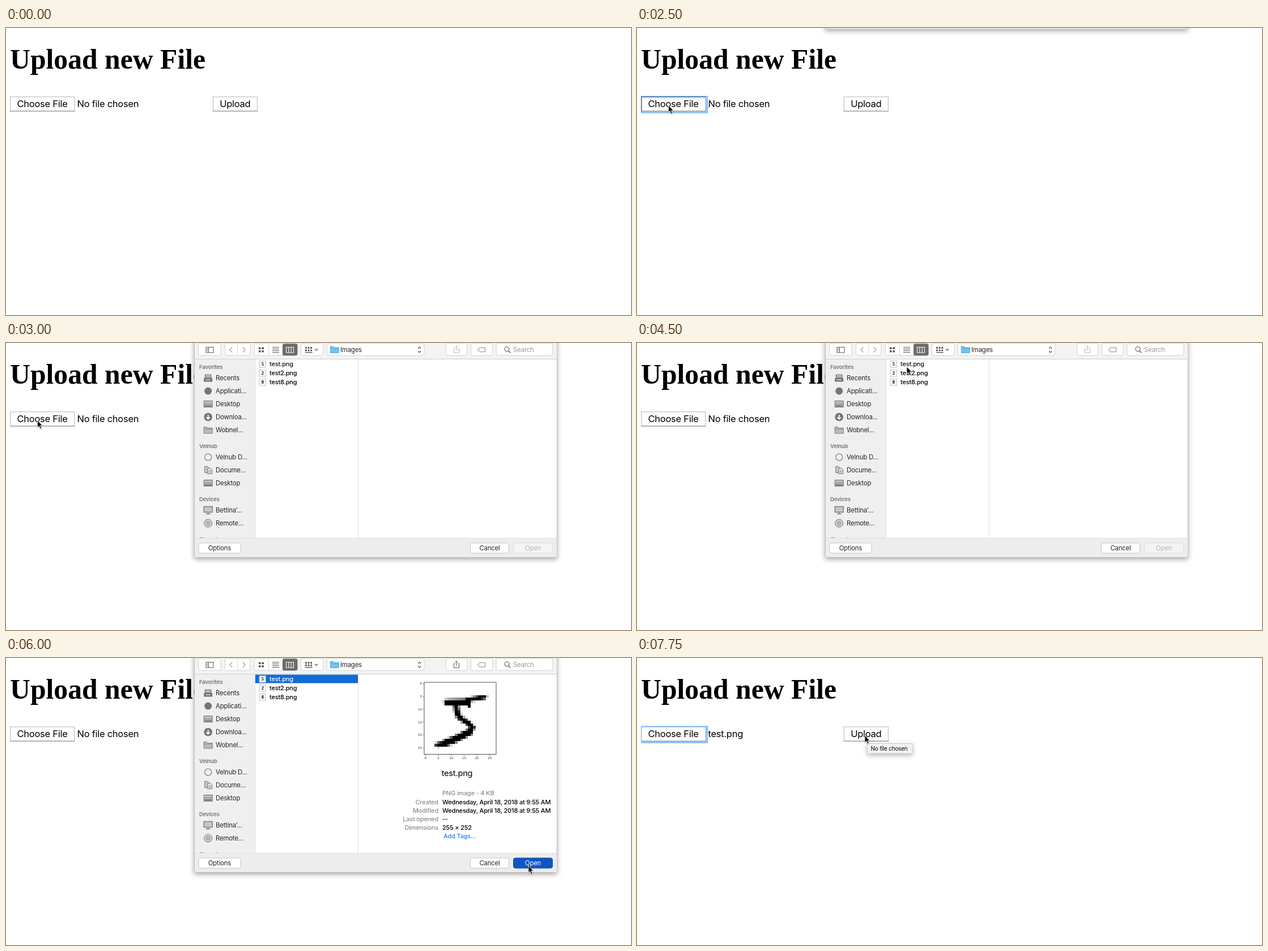
An HTML page that plays this animation: 1103 px wide and 508 px high, repeating every 8 s.

```html
<!DOCTYPE html>
<html lang="en">
<head>
<meta charset="utf-8">
<title>Upload new File</title>
<style>
  html, body { margin: 0; width: 100%; height: 100%; overflow: hidden; background: #fff; }
  svg { display: block; width: 1103px; height: 508px; }
  text { font-family: Inter, Roboto, sans-serif; letter-spacing: -.017em; white-space: pre; }
  .title { font: bold 49.7px "Liberation Serif", "Times New Roman", serif; letter-spacing: 0; }
  .form { font-size: 16.55px; }
  .ui { font-size: 11.4px; fill: #262626; }
  .head { font-size: 9.6px; font-weight: 600; fill: #747474; }
  .small { font-size: 11px; font-weight: 500; }
  .dim { fill: #8c8c8c; }
  .tick { font: 5.6px "DejaVu Sans", sans-serif; letter-spacing: 0; fill: #333; }
  .mid { text-anchor: middle; }
  .end { text-anchor: end; }
  .sheet { filter: drop-shadow(0 3px 5px rgba(0, 0, 0, .36)); }
  .tip { filter: drop-shadow(0 3px 4px rgba(0, 0, 0, .28)); }
  #cursor { filter: drop-shadow(0 1px 1px rgba(0, 0, 0, .3)); }
</style>
</head>
<body>
<svg id="stage" viewBox="0 0 1103 508" xmlns="http://www.w3.org/2000/svg"></svg>
<script>
const rect = (x, y, w, h, fill, more = '') =>
  `<rect x="${x}" y="${y}" width="${w}" height="${h}" fill="${fill}" ${more}/>`;
const text = (x, y, cls, str, more = '') =>
  `<text x="${x}" y="${y}" class="${cls}" ${more}>${str}</text>`;
const line = (d, color = '#666', w = 1, more = '') =>
  `<path d="${d}" fill="none" stroke="${color}" stroke-width="${w}" ${more}/>`;
const circle = (x, y, r, fill, more = '') =>
  `<circle cx="${x}" cy="${y}" r="${r}" fill="${fill}" ${more}/>`;
const group = (id, body) => `<g id="${id}">${body}</g>`;
const range = n => [...Array(n).keys()];

// Web page
const formButton = (x, w, label) =>
  rect(x, 121, w, 27, '#fff') +
  line(`M${x + .8} 148V121.8H${x + w - .8}V148`, '#cdcdcd', 1.6) +
  line(`M${x} 147.2H${x + w}`, '#aaa', 1.7) +
  text(x + 12.5, 140.2, 'form', label);

const page =
  text(7, 72.4, 'title', 'Upload new File') +
  formButton(7, 114.5, 'Choose File') +
  formButton(364.7, 79.6, 'Upload') +
  group('ring',
    line('M7.5 120V151', '#9fbfe8', 1.4) +
    rect(7, 120, 118, 2.6, '#92c3f7') +
    rect(7, 148, 118, 3, '#92c3f7') +
    rect(121.2, 120, 4.2, 31, '#92c3f7')) +
  group('press', line('M8 148V121.8H121.5', '#5b80b8', 1.7)) +
  group('none', text(125.5, 140.2, 'form', 'No file chosen')) +
  group('chosen', text(125.5, 140.2, 'form', 'test.png'));

// Dialog toolbar
const box = (x, w, fill = '#fff', edge = '#d2d2d2') =>
  rect(x + .5, .5, w - 1, 21.5, fill, `rx="3.5" stroke="${edge}"`);
const chevron = (x, dir) => line(`M${x - 2.3 * dir} 7.5L${x + 2.3 * dir} 12L${x - 2.3 * dir} 16.5`, '#a2a2a2', 1.2);
const dots = (x, y, cols, rows, gap, size) => range(cols * rows)
  .map(i => rect(x + i % cols * gap, y + (i / cols | 0) * gap, size, size, '#555', 'rx=".5"')).join('');
const folder = (x, y, fill, edge) =>
  `<path d="M${x} ${y + 1}h5l1.5 2h8.5v9.5h-15z" fill="${fill}" stroke="${edge}" stroke-width=".9"/>` +
  line(`M${x} ${y + 4.8}h15`, edge, .7);
const shareIcon = color =>
  line('M792.5 9.8H790.5V17.3H799.5V9.8H797.5M795 14V5.5M792.6 7.6L795 5.2L797.4 7.6', color, 1);

const toolbar =
  rect(333, 0, 639, 28, '#f3f3f3') +
  box(339, 40.5) +
  rect(353, 7.5, 13, 9.5, 'none', 'stroke="#555"') +
  line('M357.5 7.5v9.5M354.5 10h2M354.5 12h2M354.5 14h2', '#555', .9) +
  box(386, 45.5) + line('M408.5 1V22', '#dadada') + chevron(397, -1) + chevron(420, 1) +
  box(438, 76) + line('M463.5 1V22', '#dadada') +
  dots(446, 7.5, 2, 2, 5.4, 3.6) +
  line('M470 7.5h12M470 10.5h12M470 13.5h12M470 16.5h12', '#555') +
  rect(488, 1.2, 26.5, 21, '#6c6c6c', 'rx="3"') +
  rect(494.5, 7.5, 13, 9.5, 'none', 'stroke="#fff"') + line('M498.8 7.5v9.5M503.2 7.5v9.5', '#fff') +
  box(520, 40.5) +
  dots(528, 7, 3, 2, 4.6, 2.9) + rect(528, 16, 12.5, 1.4, '#555') +
  line('M545 10.5L547.6 13.2L550.2 10.5', '#555', 1.2) +
  box(566, 172.5) + folder(572.3, 5, '#70c3ee', '#4fa9d9') +
  text(590, 16, 'ui', 'Images') +
  line('M727.2 9.8L729.7 7.2L732.2 9.8M727.2 14.2L729.7 16.8L732.2 14.2', '#444', 1.2) +
  box(776, 38) + group('shareOff', shareIcon('#b4b4b4')) + group('shareOn', shareIcon('#555')) +
  box(820, 39) + line('M832 12L835.2 8.3H845.5V15.7H835.2Z', '#888') + circle(835.7, 12, .8, '#888') +
  box(864.5, 101) + circle(884, 10.8, 4, 'none', 'stroke="#555" stroke-width="1.1"') +
  line('M887 14L890.5 17.5', '#555', 1.3) +
  text(895, 16, 'ui', 'Search', 'style="fill:#9c9c9c"') +
  line('M333 28.5H972', '#cfcfcf');

// Sidebar icons, drawn around 0,0
const G = '#747474';
const icons = {
  recents: rect(-6, -6.5, 12, 8, '#8a8a8a', 'rx="1"') + line('M-4 -4.3H4M-4 -2H4', '#eee') +
    rect(-7.5, 0, 15, 6.5, G, 'rx="1"') + line('M-4 3H4', '#e8e8e8', 1.4),
  disc: circle(0, 0, 6.5, G),
  desk: rect(-7.5, -5.5, 15, 11, '#aaa', `stroke="${G}"`) + line('M-7 -3.5H7', '#ddd') +
    line('M-5.5 3.4H5.5', '#555', 1.6, 'stroke-dasharray="2 1"'),
  down: circle(0, 0, 7.3, G) + line('M0 -4V3M-3.2 .4L0 3.7L3.2 .4', '#fff', 1.8),
  folder: folder(-7.5, -6.5, '#bababa', G),
  ring: circle(0, 0, 6, 'none', `stroke="${G}" stroke-width="1.1"`),
  docs: `<path d="M-6 -6.5h5l2 2v9h-7z" fill="#c8c8c8" stroke="${G}"/>` +
    `<path d="M-1 -3.5h5l3 3v7h-8z" fill="#ddd" stroke="${G}"/>` + line('M1 1.5H5M1 3.8H5', G, .8),
  screen: rect(-7.5, -6.5, 15, 10, '#c6c6c6', `stroke="${G}" stroke-width="1.3"`) + line('M0 4V6M-4 6.5H4', G, 1.3),
  cd: circle(0, 0, 7, '#d2d2d2', `stroke="${G}"`) + circle(0, 0, 3.6, 'none', 'stroke="#999"') +
    circle(0, 0, 1.7, '#f4f4f4', `stroke="${G}"`)
};
const places = [
  [42, 'Favorites'], [62, 'Recents', 'recents'], [85, 'Applicati...', 'disc'],
  [108, 'Desktop', 'desk'], [131, 'Downloa...', 'down'], [154, 'Wobnel...', 'folder'],
  [182, 'Velnub'], [202, 'Velnub D...', 'ring'], [225, 'Docume...', 'docs'], [248, 'Desktop', 'desk'],
  [276, 'Devices'], [296, 'Bettina’...', 'screen'], [319, 'Remote...', 'cd'], [347, 'Shared']
];
const sidebar =
  rect(333, 29, 106, 316.5, '#efefef') + line('M439.5 29V345.5', '#dcdcdc') +
  `<g clip-path="url(#side)">` + places.map(([y, label, icon]) => icon
    ? `<g transform="translate(356.7 ${y})">${icons[icon]}</g>` + text(370, y + 4, 'ui', label)
    : text(341, y + 3.5, 'head', label)).join('') + '</g>';

// File column
const files = ['test.png', 'test2.png', 'test8.png'].map((name, i) => {
  const y = 37 + 16 * i;
  return rect(447, y - 5.5, 11.5, 11.5, '#fafafa', 'stroke="#b5b5b5" stroke-width=".8"') +
    text(452.8, y + 3.2, 'mid', '528'[i], 'style="font:bold 8.5px Liberation Serif,serif"') +
    text(465, y + 4, `small file${i}`, name);
}).join('');

// Handwritten digit: strokes of [half width, x, y, x, y, ...] sampled on a 28 x 28 grid
const strokes = [
  [1.1, 8.4, 7.4, 16.2, 7.2], [.7, 16, 6.4, 19, 5.9, 23, 5.2], [.3, 17, 8, 17, 9],
  [.85, 11.8, 8, 12.2, 11, 13.2, 13.2, 16.3, 15.2, 18.2, 17, 17.6, 18.7],
  [1.2, 17.3, 18.8, 14.5, 20.2, 11, 22, 8, 23], [.75, 8, 23.3, 4.7, 23.9]
];
function distance(x, y, ax, ay, bx, by) {
  const dx = bx - ax, dy = by - ay;
  const k = Math.max(0, Math.min(1, ((x - ax) * dx + (y - ay) * dy) / (dx * dx + dy * dy)));
  return Math.hypot(x - ax - k * dx, y - ay - k * dy);
}
function ink(x, y) {
  let v = 0;
  for (const [half, ...p] of strokes)
    for (let i = 0; i + 3 < p.length; i += 2)
      v = Math.max(v, 1.4 * (half + .5 - distance(x, y, ...p.slice(i, i + 4))));
  return Math.min(1, v);
}
const cell = 4.54;
const digit = range(784).map(i => {
  const c = i % 28, r = i / 28 | 0, v = ink(c, r);
  return v > .04 ? rect((738 + c * cell).toFixed(2), (43 + r * cell).toFixed(2), cell, cell, '#000', `opacity="${v.toFixed(2)}"`) : '';
}).join('');
const ticks = range(6).map(k => {
  const d = k * 5 * cell;
  return line(`M736 ${45.3 + d}H738M${740.3 + d} 171V173`, '#333', .7) +
    text(734, 47.4 + d, 'tick end', k * 5) + text(740.3 + d, 179, 'tick mid', k * 5);
}).join('');
const when = 'Wednesday, April 18, 2018 at 9:55 AM';
const info = [['Created', when], ['Modified', when], ['Last opened', '--'], ['Dimensions', '255 × 252']]
  .map(([k, v], i) => text(763, 258.5 + 15.1 * i, 'small dim end', k) + text(770, 258.5 + 15.1 * i, 'small', v)).join('');

const preview = group('preview',
  `<g shape-rendering="crispEdges">${digit}</g>` +
  rect(738, 43, 127, 127.5, 'none', 'stroke="#222" stroke-width=".8"') + ticks +
  text(796, 208.8, 'mid', 'test.png', 'font-size="14.7"') +
  text(770, 243.4, 'small dim', 'PNG image - 4 KB') + info +
  text(772, 319, 'small', 'Add Tags...', 'fill="#2a80e6"'));

// Dialog footer
const pushButton = (x, w, label, fill = '#fff', edge = '#c6c6c6', color = '#222') =>
  rect(x + .5, 354, w - 1, 18, fill, `rx="3.5" stroke="${edge}"`) +
  text(x + w / 2, 367, 'ui mid', label, `style="fill:${color}"`);
const footer =
  rect(333, 345.5, 639, 33.5, '#ededed') + line('M333 345.5H972', '#e0e0e0') +
  pushButton(339.5, 75, 'Options') + pushButton(819, 69, 'Cancel') +
  group('openOff', pushButton(895, 70, 'Open', '#f4f4f4', '#dadada', '#b6b6b6')) +
  group('openOn', pushButton(895, 70, 'Open', 'url(#blue)', '#1f6fd8', '#fff')) +
  group('openDown', pushButton(895, 70, 'Open', '#0f56c4', '#0d4cae', '#fff'));

const dialog = group('dialog',
  rect(332.5, -40, 639.5, 419.3, '#f0f0f0', 'class="sheet" stroke="#b9b9b9" stroke-width=".8"') +
  rect(440, 29, 531.5, 316.5, '#fff') + line('M621.5 29V345.5', '#dedede') +
  toolbar + sidebar + group('row', rect(440, 29.5, 181, 15, '#106ad8')) + files + preview + footer);

const tip = group('tip',
  rect(406.5, 151.5, 79.5, 17.5, '#f3f3f3', 'class="tip" stroke="#c9c9c9" stroke-width=".9"') +
  text(412.5, 163.6, '', 'No file chosen', 'font-size="9.9"'));

const cursor = group('cursor',
  '<path d="M0 0V12.6L2.8 10L5 14.9L7.2 13.9L5.1 9.2H8.9Z" fill="#000" stroke="#fff" stroke-width=".9"/>');

const stage = document.getElementById('stage');
stage.innerHTML =
  '<defs><linearGradient id="blue" x2="0" y2="1"><stop stop-color="#57a3f6"/><stop offset="1" stop-color="#1465de"/></linearGradient>' +
  '<clipPath id="side"><rect x="333" y="29" width="106" height="316"/></clipPath></defs>' +
  page + dialog + tip + cursor;

// Pointer stops: [ms, x, y], each held until the next
const path = [
  [750, 695, 92], [1000, 430, 106], [1250, 170, 132], [1500, 25, 147], [1750, 55.5, 137],
  [3500, 64, 136], [3750, 180, 108], [4000, 370, 58], [4250, 466, 38], [4500, 476, 42],
  [5250, 620, 150], [5500, 850, 325], [5750, 922, 367.5], [6250, 920.5, 366.5],
  [6500, 905, 360], [6750, 760, 306], [7000, 543, 222], [7250, 425, 152], [7500, 402, 137]
];
const LOOP = 8000, STEP = 250;
const el = id => document.getElementById(id);
const show = (id, on) => el(id).setAttribute('visibility', on ? 'visible' : 'hidden');

function draw(ms) {
  const t = Math.floor(ms % LOOP / STEP) * STEP;
  const within = (a, b) => t >= a && t < b;
  const picked = t >= 4750;
  const stop = path.filter(p => p[0] <= t).pop();
  show('cursor', stop);
  if (stop) el('cursor').setAttribute('transform', `translate(${stop[1]} ${stop[2]})`);

  show('ring', within(2000, 3000) || t >= 6250);
  show('press', within(2000, 3000));
  show('none', t < 6250);
  show('chosen', t >= 6250);

  el('dialog').style.display = within(2500, 6250) ? '' : 'none';
  el('dialog').setAttribute('transform', `translate(0 ${t < 2750 ? -377.5 : 0})`);
  show('row', picked);
  show('preview', picked);
  show('shareOn', picked);
  show('shareOff', !picked);
  show('openOff', !picked);
  show('openOn', within(4750, 6000));
  show('openDown', t >= 6000);
  document.querySelector('.file0').setAttribute('fill', picked ? '#fff' : '#111');
  show('tip', t >= 7750);
}

const start = performance.now();
function tick() {
  draw(performance.now() - start);
  requestAnimationFrame(tick);
}
tick();
</script>
</body>
</html>
```
